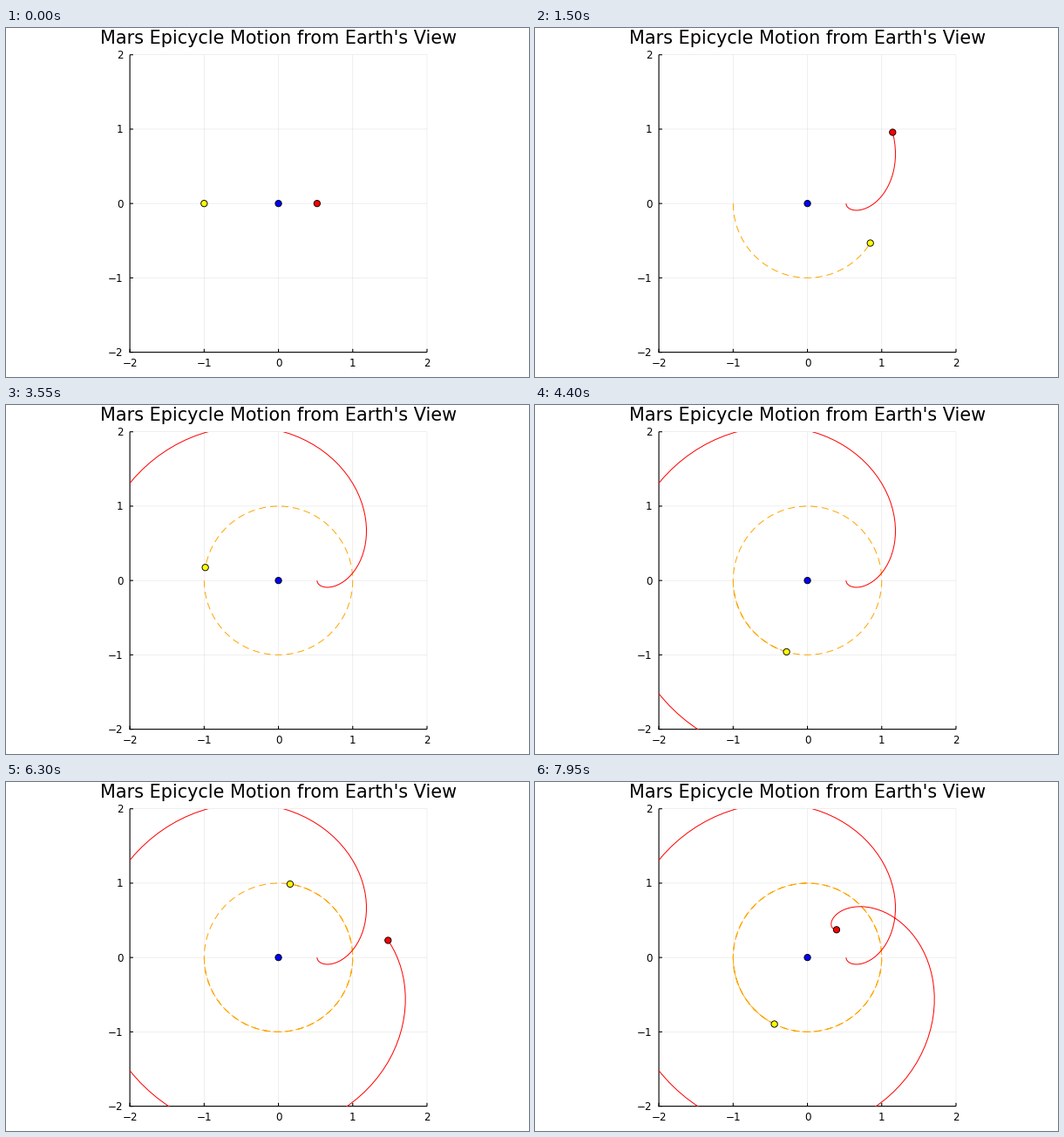
Animation, 600 px wide and 400 px high, one loop 8 s. Source, as a matplotlib script:

```python
import numpy as np
import matplotlib.pyplot as plt
from matplotlib.animation import FuncAnimation
from matplotlib.patches import Circle, Rectangle

plt.rcParams["font.family"] = "DejaVu Sans"
plt.rcParams["path.simplify"] = False

W, H, DPI = 600, 400, 100
PX = 72 / DPI                       # points per pixel
FRAMES, STEP_MS = 160, 50
LEFT, RIGHT, TOP, BOTTOM = 142.1, 483.0, 30.7, 371.6
LIMIT = 2

DAYS_PER_FRAME = 5
EARTH_YEAR, MARS_YEAR = 365.25, 687
MARS_RADIUS = 1.52


def to_px(x, y):
    """Map plot units to stage pixels (y downwards)."""
    px = LEFT + (x + LIMIT) * (RIGHT - LEFT) / (2 * LIMIT)
    py = BOTTOM - (y + LIMIT) * (BOTTOM - TOP) / (2 * LIMIT)
    return px, py


def orbit(radius, period):
    angle = 2 * np.pi * DAYS_PER_FRAME * np.arange(FRAMES) / period
    return radius * np.cos(angle), radius * np.sin(angle)


earth_x, earth_y = orbit(1, EARTH_YEAR)
mars_x, mars_y = orbit(MARS_RADIUS, MARS_YEAR)
sun_px = to_px(-earth_x, -earth_y)
mars_px = to_px(mars_x - earth_x, mars_y - earth_y)

fig = plt.figure(figsize=(W / DPI, H / DPI), dpi=DPI, facecolor="white")
ax = fig.add_axes([0, 0, 1, 1])
ax.set_xlim(0, W)
ax.set_ylim(H, 0)
ax.axis("off")


def line(xs, ys, color="black", width=1.0, **kw):
    return ax.plot(xs, ys, color=color, lw=width * PX,
                   solid_capstyle="butt", dash_capstyle="butt",
                   snap=False, **kw)[0]


def label(x, y, text, size, align):
    ax.text(x, y, text, fontsize=size * PX, ha=align, va="baseline")


# Grid, axes and labels
ticks = range(-LIMIT, LIMIT + 1)
for t in ticks:
    gx, gy = to_px(t, t)
    line([gx, gx], [TOP, BOTTOM], width=0.6, alpha=0.1, zorder=1)
    line([LEFT, RIGHT], [gy, gy], width=0.6, alpha=0.1, zorder=1)
line([LEFT, LEFT], [TOP, BOTTOM + 0.5], width=1.1, zorder=2)
line([LEFT - 0.5, RIGHT], [BOTTOM, BOTTOM], width=1.1, zorder=2)
for t in ticks:
    gx, gy = to_px(t, t)
    line([gx, gx], [BOTTOM, BOTTOM - 3.8], width=1.1, zorder=2)
    line([LEFT, LEFT + 3.8], [gy, gy], width=1.1, zorder=2)
    name = str(t).replace("-", "\u2212")
    label(gx, 387.6, name, 11.9, "center")
    label(134.3, gy + 4.4, name, 11.9, "right")
label((LEFT + RIGHT) / 2 - 0.3, 18.3,
      "Mars Epicycle Motion from Earth's View", 20.8, "center")

# Trails and bodies
clip = Rectangle((LEFT, TOP), RIGHT - LEFT, BOTTOM - TOP,
                 transform=ax.transData)
sun_trail = line([], [], "orange", zorder=3, dashes=(8, 5))
mars_trail = line([], [], "red", zorder=4)


def body(center, color, z):
    dot = Circle(center, 3.65, facecolor=color, edgecolor="black",
                 lw=0.9 * PX, zorder=z)
    return ax.add_patch(dot)


sun = body((0, 0), "yellow", 5)
earth = body(to_px(0, 0), "blue", 6)
mars = body((0, 0), "red", 7)
for art in (sun_trail, mars_trail, sun, earth, mars):
    art.set_clip_path(clip)


def update(i):
    for trail, dot, (xs, ys) in ((sun_trail, sun, sun_px),
                                 (mars_trail, mars, mars_px)):
        trail.set_data(xs[:i + 1], ys[:i + 1])
        dot.center = xs[i], ys[i]
        dot.set_visible(bool(LEFT <= xs[i] <= RIGHT and TOP <= ys[i] <= BOTTOM))
    return sun_trail, mars_trail, sun, earth, mars


anim = FuncAnimation(fig, update, frames=FRAMES, interval=STEP_MS,
                     init_func=lambda: update(0), repeat=True, repeat_delay=0)
plt.show()
```
